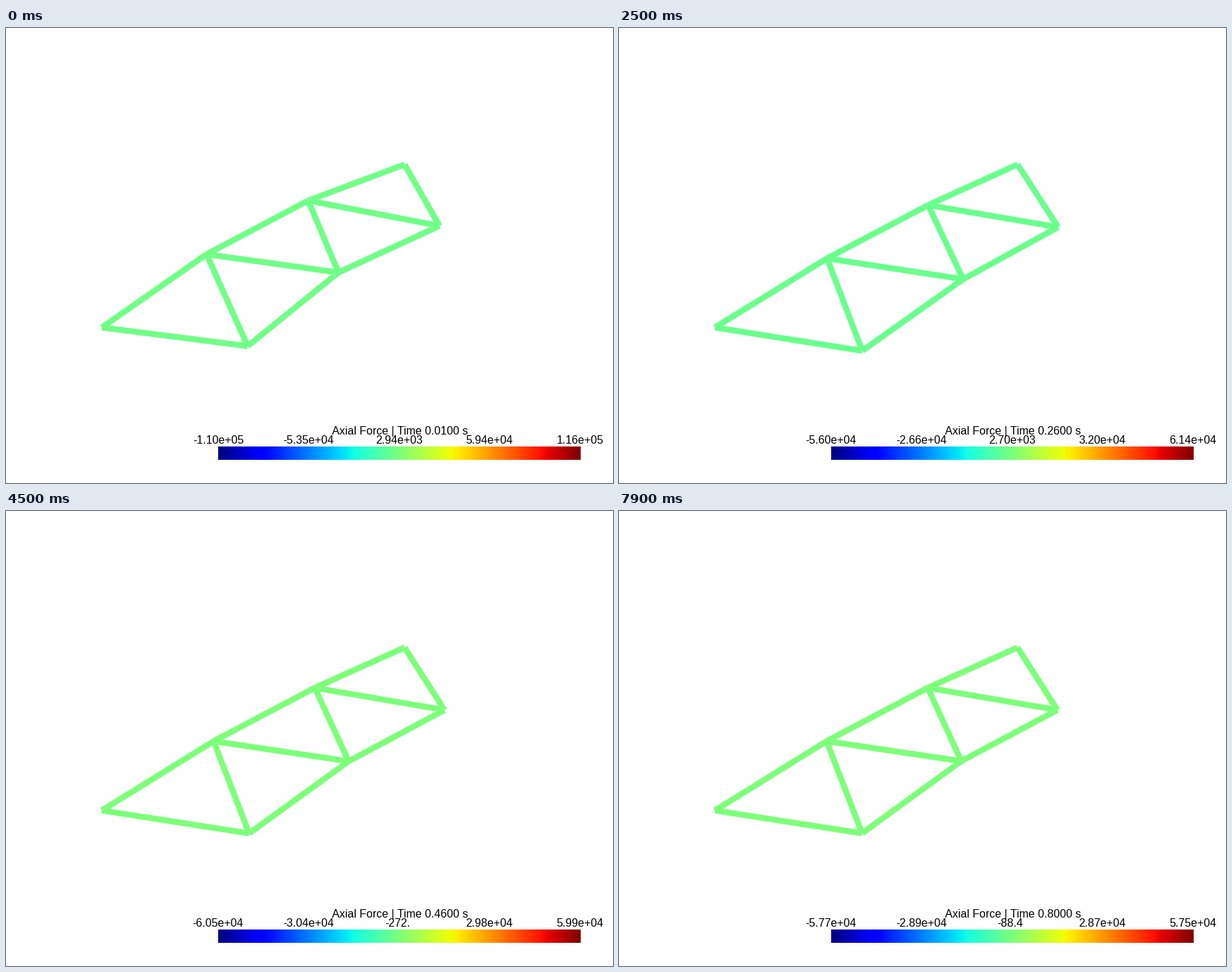
A matplotlib script for the animation above (8000 ms loop, 864x648 px).

```python
import numpy as np
import matplotlib.pyplot as plt
from matplotlib.animation import FuncAnimation
from matplotlib.collections import LineCollection

W, H, DPI = 864, 648, 72
FRAMES, STEP_MS, DT = 80, 100, 0.01
PERIOD = 0.17
FONT = dict(family="Liberation Sans", fontsize=16, color="black",
            ha="center", va="baseline")

# Joint: rest position, first deflection, damping (A and D are supports)
JOINTS = {
    "A": ((136.5, 426.5), (0, 0), 0),
    "B": ((295.5, 327.8), (-10, -5.5), 11),
    "C": ((439.5, 251.8), (-9.3, -6), 11),
    "D": ((567.3, 194.4), (0, 0), 0),
    "E": ((346, 459), (-2, -6), 8.5),
    "F": ((487.2, 356.2), (-14, -8), 6.5),
    "G": ((624, 283.4), (-7, -1.6), 7.5),
}
MEMBERS = "AB BC CD AE EF FG GD BE BF CF CG".split()


def joint_at(name, s):
    rest, push, damping = JOINTS[name]
    swing = np.exp(-damping * s) * np.cos(2 * np.pi * s / PERIOD)
    return np.array(rest) + np.array(push) * swing


def force_range(s):
    """Lowest and highest axial force, s seconds after the first step."""
    wave = np.cos(2 * np.pi * s / PERIOD)
    u = s / 0.16
    ring = u**2 * np.exp(-u**3) * wave        # late burst of compression
    mid = -515 + 540 * s + 3455 * np.exp(-50 * s) - 58200 * ring
    half = 63620 - 7600 * s + 49300 * np.exp(-21 * s) * wave + 53000 * ring
    return mid - half, mid + half


fig = plt.figure(figsize=(W / DPI, H / DPI), dpi=DPI, facecolor="white")
ax = fig.add_axes([0, 0, 1, 1])
jet = plt.get_cmap("jet")

ax.imshow(np.linspace(0, 1, 256)[None], cmap=jet, aspect="auto",
          extent=(302.4, 817.6, 615, 596), interpolation="nearest")
ax.set(xlim=(0, W), ylim=(H, 0))
ax.axis("off")

truss = LineCollection([], linewidths=8.44, capstyle="butt")
ax.add_collection(truss)
title = ax.text(561, 578.5, "", **FONT)
ticks = np.linspace(302, 817, 5)
labels = [ax.text(x, 591.5, "", **FONT) for x in ticks]


def update(i):
    s = i * DT
    spots = {name: joint_at(name, s) for name in JOINTS}
    truss.set_segments([[spots[a], spots[b]] for a, b in MEMBERS])

    low, high = force_range(s)
    truss.set_color(jet(float(-low / (high - low))))   # colour of zero force
    title.set_text(f"Axial Force | Time {s + DT:.4f} s")
    for label, x, value in zip(labels, ticks, np.linspace(low, high, 5)):
        text = f"{value:#.3g}"
        label.set_text(text)
        label.set_x(x if "e" in text else x - 2.5)
    return [truss, title, *labels]


anim = FuncAnimation(fig, update, frames=FRAMES, interval=STEP_MS,
                     init_func=lambda: update(0), repeat=True, repeat_delay=0)
plt.show()
```
